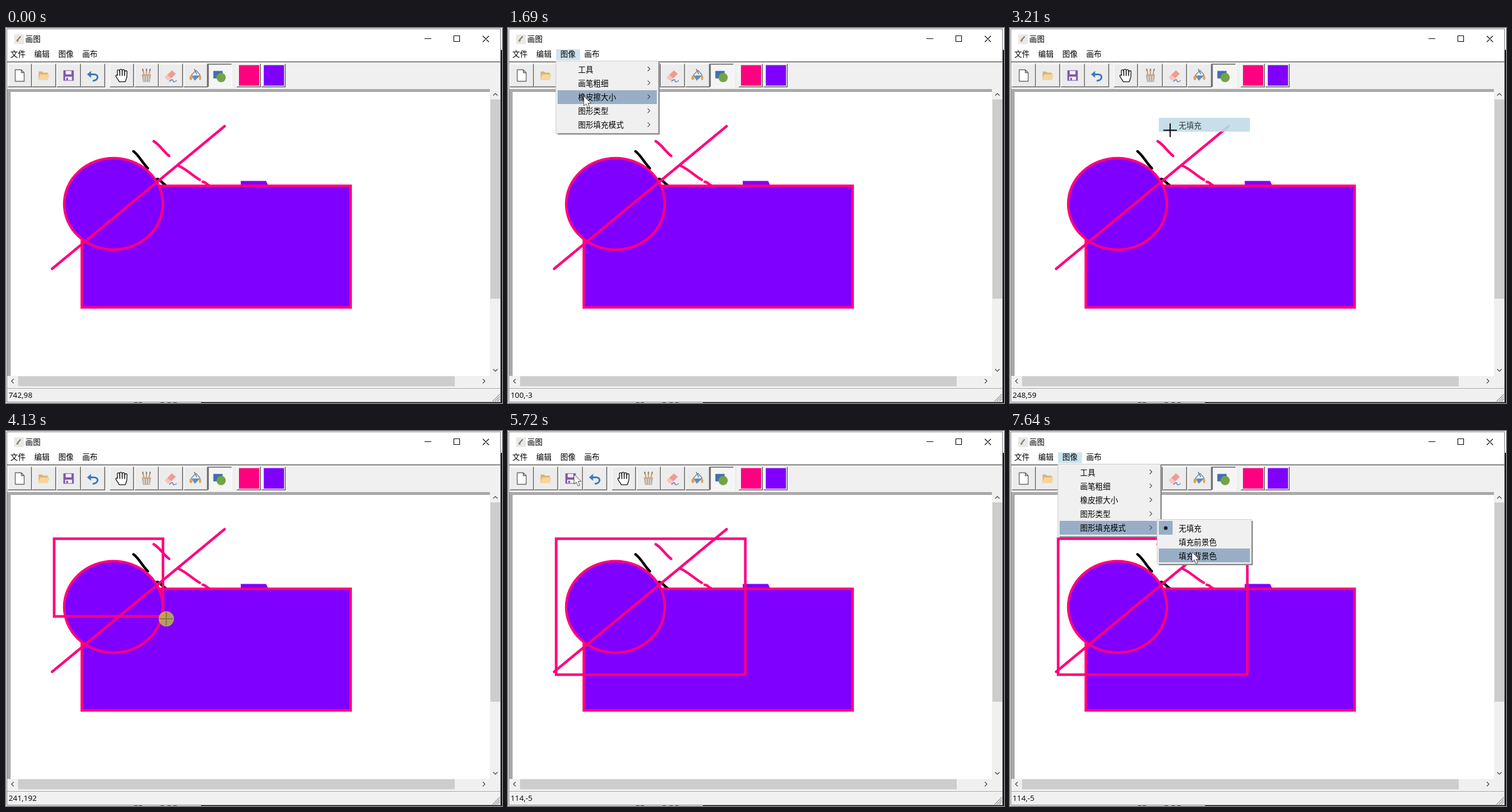
Write an HTML page with a canvas that moves like this. It is 860 by 651 pixels and loops after 8000 ms.

```html
<!DOCTYPE html>
<html lang="zh">
<head>
<meta charset="utf-8">
<style>
html, body { margin: 0; width: 100%; height: 100%; overflow: hidden; background: #fff; }
canvas { display: block; }
</style>
</head>
<body>
<canvas id="stage" width="860" height="651"></canvas>
<script>
const g = document.getElementById('stage').getContext('2d');
const LOOP = 8000, PINK = '#ff0080', PURPLE = '#8000ff', FACE = '#f0f0f0', HOVER = '#99aec6';
const CJK = '13.2px "Noto Sans CJK SC", "Noto Sans CJK", "Noto Sans", sans-serif';
const LATIN = '13.3px "Open Sans", "Noto Sans", sans-serif';

// The screen refreshes every 100 ms, counted anew from each burst of activity
const BURSTS = [0, 890, 2290, 3110, 3930, 5120, 6020, 6840];
// Pointer stops: time, x, y; it moves evenly between them
const STOPS = [
  [0, 839, 221], [990, 120, 107.6], [1190, 104, 48], [1390, 104, 48], [1690, 131, 118],
  [1890, 144, 160], [2290, 144, 160], [3110, 309, 176], [3830, 83.5, 187], [3930, 83.5, 187],
  [4130, 278, 326], [4500, 411.5, 423], [5120, 411.5, 423], [5640, 135.7, 105.4], [5720, 114, 75],
  [6120, 104, 47], [6420, 104, 47], [6840, 144, 160], [7140, 155, 163], [7640, 315, 210]
];
const CLICKS = [1190, 2290, 3010, 6120, 7040];
const PICK = 3110, PRESS = 3830, DRAG = 3930, RELEASE = 5120;

const inside = (t, a, b) => t >= a && t < b;

function snap(t) {
  const start = BURSTS.filter(b => b <= t).pop();
  return start + Math.floor((t - start) / 100) * 100;
}

function pointer(t) {
  const i = STOPS.findIndex(s => s[0] > t);
  if (i < 0) return STOPS[STOPS.length - 1].slice(1);
  const [t0, x0, y0] = STOPS[Math.max(i - 1, 0)], [t1, x1, y1] = STOPS[i];
  const u = Math.max(0, (t - t0) / (t1 - t0));
  return [x0 + (x1 - x0) * u, y0 + (y1 - y0) * u];
}

function box(x, y, w, h, color) {
  g.fillStyle = color;
  g.fillRect(x, y, w, h);
}

function path(d, fill, stroke, width = 1) {
  const p = new Path2D(d);
  if (fill) { g.fillStyle = fill; g.fill(p); }
  if (stroke) { g.strokeStyle = stroke; g.lineWidth = width; g.stroke(p); }
}

function oval(x, y, rx, ry, fill, stroke, width) {
  g.beginPath();
  g.ellipse(x, y, rx, ry, 0, 0, 7);
  g.fillStyle = fill;
  g.fill();
  if (stroke) { g.strokeStyle = stroke; g.lineWidth = width; g.stroke(); }
}
const disc = (x, y, r, color) => oval(x, y, r, r, color);
const line = (x0, y0, x1, y1, color, width) => path(`M${x0} ${y0}L${x1} ${y1}`, null, color, width);

// Freehand stroke: a line with a slight S-bend
function scribble(x0, y0, x1, y1, color) {
  const dx = (x1 - x0) / 3, dy = (y1 - y0) / 3;
  path(`M${x0} ${y0}C${x0 + dx + 2} ${y0 + dy - 2} ${x1 - dx - 1} ${y1 - dy + 1} ${x1} ${y1}`, null, color, 4.4);
}

function text(s, x, y, color = '#000', font = CJK) {
  g.font = font;
  g.fillStyle = color;
  g.fillText(s, x, y);
}

function at(x, y, draw, turn = 0) {
  g.save();
  g.translate(x, y);
  g.rotate(turn * Math.PI / 2);
  draw();
  g.restore();
}

const chevron = (x, y, turn = 0) => at(x, y, () => path('M-2-3.5L1.5 0L-2 3.5', null, '#444', 1.1), turn);

function frameRect(x, y, r, b) {
  g.strokeStyle = PINK;
  g.lineWidth = 4.5;
  g.lineJoin = 'miter';
  g.strokeRect(x, y, r - x, b - y);
  g.lineJoin = 'round';
}

function button(x, pressed) {
  box(x, 62, 42, 41, pressed ? '#fff' : '#696969');
  box(x, 62, 41, 40, pressed ? '#696969' : '#fff');
  box(x + 1, 63, 40, 39, '#a4a4a4');
  box(x + 1 + pressed, 63 + pressed, 39, 38, pressed ? '#f5f5f5' : '#ececec');
}

function sheet() {
  path('M-7.5-10H3L8-5V10H-7.5ZM3-10V-5H8', '#fff', '#666', 1.4);
}

function folder() {
  path('M-9-7H-3L-1-5H7V7H-9Z', '#d9b476');
  path('M-6-2H10L7 8H-10Z', '#f6d49b');
}

function floppy() {
  box(-9, -9, 18, 18, '#7e57a8');
  box(-5, -8, 10, 6, '#f4f0f8');
  box(-6, 2, 12, 6, '#f4f0f8');
  box(-4, 4, 3, 4, '#7e57a8');
}

function undo() {
  path('M-6-2H2C11-2 10 8 1 9', null, '#3f78b8', 3);
  path('M-10-2L-3-8V4Z', '#3f78b8');
}

// Outlined by painting the same limbs twice, wide black then white
function hand() {
  for (const [color, w] of [['#111', 5.2], ['#fff', 2.6]]) {
    for (let i = 0; i < 4; i++) line(-5 + i * 4, 3, -5.5 + i * 4.3, -7 - 2 * Math.sin(i + 0.5), color, w);
    line(-8, 1, -4, 7, color, w);
    path('M-5 2H7L5 9H-3Z', color, color, w);
  }
}

function brushes() {
  for (let i = -1; i < 2; i++) {
    line(i * 4, 0, i * 6, -9, '#e59a55', 2.2);
    line(i * 6, -9, i * 6.5, -11, '#777', 2);
  }
  path('M-8-2H8L6 11H-6Z', '#b9aaa0');
  for (let i = -1; i < 2; i++) line(i * 4, 1, i * 4, 9, '#e5dbd3', 1.5);
}

function eraser() {
  path('M-10 3L2-9L9-3L-2 8H-6Z', '#f09a94');
  path('M-10 3L-6-1L2 5L-2 8H-6Z', '#f8c4bd');
  path('M-2 10Q4 5 4 9T10 9', null, '#5277ad', 1.3);
}

function bucket() {
  path('M-7-1L1-9L8-1L-1 8Z', '#ececec', '#76879b', 1.4);
  path('M-5 0H7L-1 7Z', '#548bc4');
  line(-2, -11, 2, -3, '#60758c', 1.5);
  oval(-8, 4, 2.5, 4, '#e8a04e');
  oval(8, 4, 2, 4, '#e8a04e');
}

function shapes() {
  box(-11, -8, 16, 13, '#3f6fb5');
  disc(2.5, 3.5, 8, '#74a343');
}

function drawToolbar() {
  const tools = [sheet, folder, floppy, undo, hand, brushes, eraser, bucket, shapes, PINK, PURPLE];
  tools.forEach((tool, i) => {
    // Wider gaps before the hand and the two colours
    const x = 2.6 + i * 42.6 + (i > 3 ? 7 : 0) + (i > 8 ? 7 : 0);
    const left = Math.round(x);
    button(left, tool === shapes ? 1 : 0);
    if (tool.call) at(left + 20.5, 82.5, tool);
    else box(left + 4, 64.5, 35, 35.5, tool);
  });
}

function drawWindow() {
  box(0, 0, 860, 651, '#fff');
  box(858, 38, 2, 613, '#15151a');
  box(1, 1, 857, 649, '#777');
  box(2, 2, 855, 55, '#fff');
  box(338, 650, 522, 1, '#111');
  for (const x of [222, 230, 268, 280, 290]) box(x, 650, 6, 1, '#777');

  box(14, 11, 17, 17, '#e9e9e9');
  line(19, 22, 25, 15, '#777', 2);
  disc(20, 22, 2, '#b98a58');
  text('画图', 33.5, 24);
  path('M726 18.5H737M776.5 13.5H786.5V23.5H776.5ZM827 14L837 24M837 14L827 24', null, '#000', 1.1);

  box(2, 57, 855, 592, FACE);
  box(2, 58, 855, 1.5, '#696969');
  drawToolbar();

  box(2, 106, 837, 498, '#a9a9a9');
  box(8, 111, 831, 493, '#fff');
  box(840, 124, 17, 346, '#cdcdcd');
  box(21, 604.5, 757, 17.5, '#cdcdcd');
  chevron(848.5, 115, 3);
  chevron(848.5, 594.5, 1);
  chevron(11, 613, 2);
  chevron(829, 613);
  box(2, 624, 855, 1, '#fff');
  box(2, 625, 855, 1, '#a0a0a0');
  for (let d = 4; d <= 12; d += 4) line(856 - d, 648, 856, 648 - d, '#999', 1.2);
}

function drawPainting(t) {
  scribble(221, 214, 246, 243.5, '#000');
  scribble(262, 262, 277, 273, '#000');
  scribble(256, 196.5, 283, 222, PINK);
  scribble(299, 239, 336, 263.5, PINK);
  scribble(341, 267, 352, 273, PINK);
  path('M407 265.5H451L454 272H407Z', PURPLE);
  box(131.5, 274, 466, 211, PURPLE);
  frameRect(131.5, 274, 597.5, 485);
  oval(186.5, 305.5, 85.5, 79.5, PURPLE, PINK, 4.5);
  line(80, 418, 379, 170.5, PINK, 4.5);
  // The rubber band trails the pointer slightly
  if (t > DRAG) frameRect(83.5, 187, ...pointer(Math.min(t, RELEASE) - 6));
}

function panel(x, y, w, h) {
  box(x + w, y + 3, 2, h - 1, '#888');
  box(x + 3, y + h, w - 3, 2, '#888');
  box(x, y, w, h, FACE);
  g.strokeStyle = '#ccc';
  g.lineWidth = 1;
  g.strokeRect(x + 0.5, y + 0.5, w - 1, h - 1);
}

function drawMenus(t, x, y) {
  const second = t > 6000;
  const open = inside(t, 1290, PICK) || t >= 6220;
  const subStart = second ? 7140 : 2390;
  const subOpen = open && t >= subStart;
  if (open || (y < 57 && x > 84 && x < 125)) box(83.5, 37, 41.5, 19, '#cce4ec');
  ['文件', '编辑', '图像', '画布'].forEach((s, i) => text(s, 7.5 + i * 41.6, 50));

  if (open) {
    g.globalAlpha = t < (second ? 6320 : 1390) ? 0.5 : 1;
    panel(83, 57, 178, 126);
    const row = subOpen ? 4 : Math.floor((y - 60) / 24);
    ['工具', '画笔粗细', '橡皮擦大小', '图形类型', '图形填充模式'].forEach((s, i) => {
      const cy = 71.5 + i * 24.2;
      if (i === row) box(86, Math.round(cy - 12.3), 172, 24, HOVER);
      text(s, 121.5, cy + 5);
      chevron(244.5, cy - 0.5);
    });
  }
  if (subOpen) {
    g.globalAlpha = t < subStart + 100 ? 0.53 : 1;
    panel(255, 153, 164, 78);
    const row = x > 258 ? Math.floor((y - 156) / 24) : -1;
    ['无填充', '填充前景色', '填充背景色'].forEach((s, i) => {
      const cy = 168.5 + i * 24;
      if (i === row) box(258, cy - 12.5, 158, 24, HOVER);
      if (i === (second ? 0 : 2)) {
        box(258, cy - 12.5, 24, 24, HOVER);
        disc(270, cy, 3.3, '#222');
      }
      text(s, 292.5, cy + 5);
    });
  }
  g.globalAlpha = 1;

  // Chosen entry fading out
  if (inside(t, PICK, PICK + 300)) {
    g.globalAlpha = 1 - ((t - PICK) / 300) ** 2;
    box(258, 156, 158, 24, '#c0dbe8');
    text('无填充', 292.5, 173.5, '#222');
    g.globalAlpha = 1;
  }
  return open;
}

function drawPointer(t, x, y, menuOpen) {
  if (t < 100) return;
  const dragging = inside(t, PRESS, RELEASE);
  if (dragging) disc(x, y, 13.3, 'rgba(200,205,60,.75)');
  if (CLICKS.some(c => inside(t, c, c + 120))) disc(x, y, 13.3, 'rgba(250,190,90,.85)');
  const cross = !menuOpen && y > 111 && x < 839;
  at(x, y, () => cross
    ? path('M-11 0H11M0-11V11', null, dragging ? '#87802f' : '#000', 2)
    : path('M.5 .5V17L4.5 13.5L7.5 20.5L10.5 19.2L7.6 12.5H12.5Z', '#fff', '#555'));
}

// Canvas coordinates, frozen while the pointer is off the canvas
function drawStatus(t) {
  const seen = t < PICK ? Math.min(t, 990) : t < PRESS ? t - 26 : Math.min(t, 5640);
  const [x, y] = pointer(seen);
  text(`${Math.round((x - 8) / 1.12)},${Math.round((y - 111) / 1.12)}`, 4.5, 642, '#000', LATIN);
}

function render(now) {
  const t = snap(now % LOOP);
  const [x, y] = pointer(t);
  g.lineCap = g.lineJoin = 'round';
  drawWindow();
  drawPainting(t);
  drawStatus(t);
  const menuOpen = drawMenus(t, x, y);
  drawPointer(t, x, y, menuOpen);
  requestAnimationFrame(render);
}
requestAnimationFrame(render);
</script>
</body>
</html>
```
